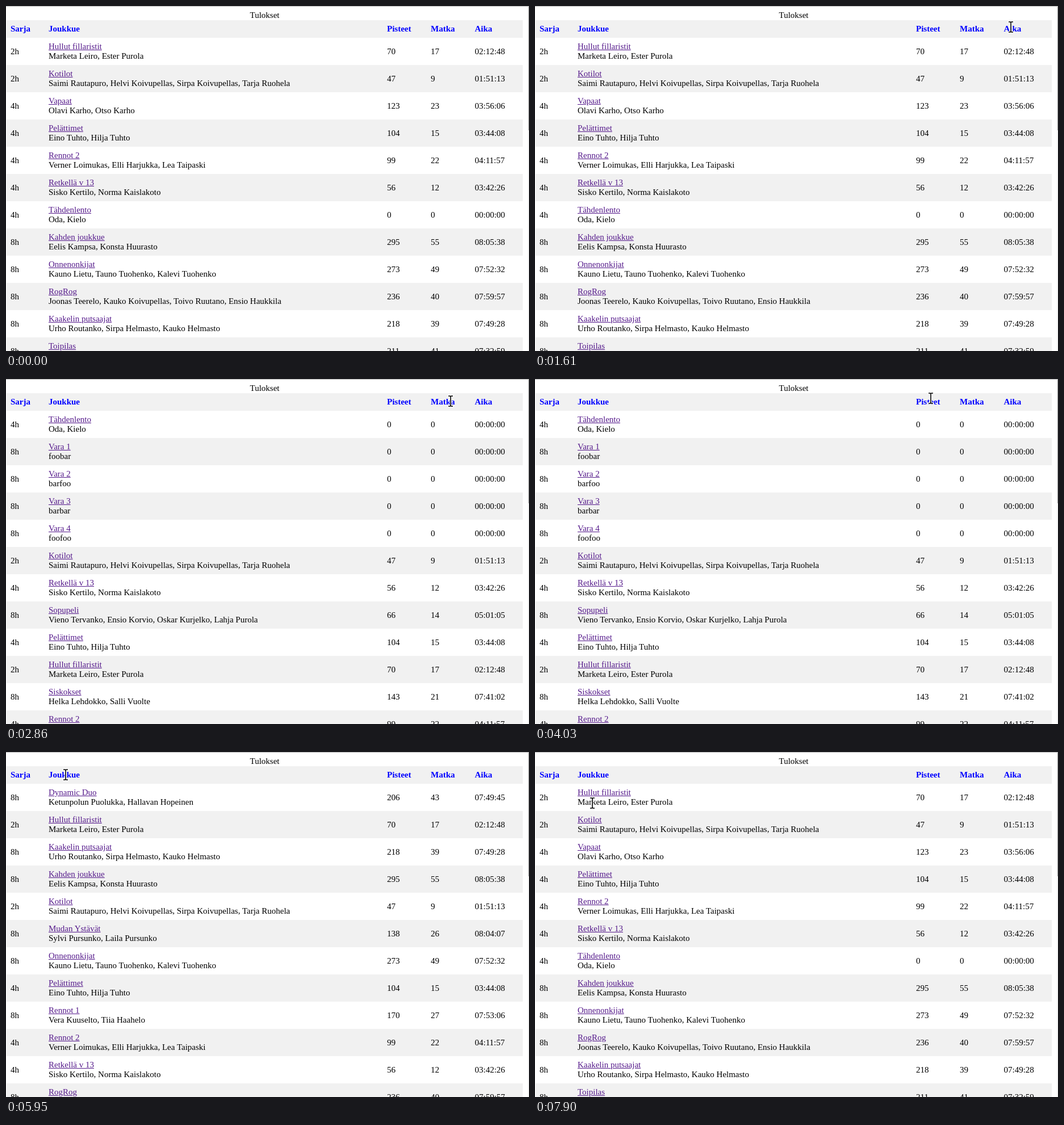
These frames come from a looping animation (921x608 px, 8000 ms). An HTML page:

```html
<!DOCTYPE html>
<html lang="fi">
<head>
<meta charset="utf-8">
<title>Tulokset</title>
<style>
  html, body { margin: 0; width: 100%; height: 100%; overflow: hidden; background: #fff; }
  #stage {
    position: relative; width: 921px; height: 608px; overflow: hidden;
    font: 15px/17px "Liberation Serif", "Times New Roman", serif; color: #000; white-space: nowrap;
  }
  #stage > * { position: absolute; }
  table, caption, thead, tbody, tr, th, td { display: block; margin: 0; padding: 0; text-align: left; }
  table { left: 1px; top: 8px; width: 909px; }
  caption { height: 17px; text-align: center; }
  tr { position: relative; height: 48px; }
  tr:nth-child(even), thead tr { background: #f1f1f1; }
  thead tr { height: 31px; color: #00f; }
  th, td { position: absolute; left: 7px; top: 16px; }
  thead th, td:nth-child(2) { top: 7px; }
  :nth-child(2):is(th, td) { left: 74px; }
  :nth-child(3):is(th, td) { left: 670px; }
  :nth-child(4):is(th, td) { left: 747px; }
  :nth-child(5):is(th, td) { left: 824.5px; }
  u { color: #551a8b; }
  .edge { left: 0; top: 0; width: 921px; height: 1px; background: #b4b4b4; }
  .track { left: 919px; top: 1px; width: 2px; height: 607px; background: #f1f1f1; }
  .thumb { left: 920px; top: 1px; width: 1px; height: 218px; background: #a0a0a0; }
  #click {
    width: 28px; height: 28px; margin: -14px; border-radius: 50%;
    background: rgba(255, 255, 0, .47); pointer-events: none;
  }
  #cursor { left: 0; top: 0; width: 1px; height: 1px; overflow: visible; pointer-events: none; }
</style>
</head>
<body>
<div id="stage">
  <table>
    <caption>Tulokset</caption>
    <thead><tr><th>Sarja<th>Joukkue<th>Pisteet<th>Matka<th>Aika</thead>
    <tbody>
      <tr><td>2h<td><u>Hullut fillaristit</u><br>Marketa Leiro, Ester Purola<td>70<td>17<td>02:12:48
      <tr><td>2h<td><u>Kotilot</u><br>Saimi Rautapuro, Helvi Koivupellas, Sirpa Koivupellas, Tarja Ruohela<td>47<td>9<td>01:51:13
      <tr><td>4h<td><u>Vapaat</u><br>Olavi Karho, Otso Karho<td>123<td>23<td>03:56:06
      <tr><td>4h<td><u>Pelättimet</u><br>Eino Tuhto, Hilja Tuhto<td>104<td>15<td>03:44:08
      <tr><td>4h<td><u>Rennot 2</u><br>Verner Loimukas, Elli Harjukka, Lea Taipaski<td>99<td>22<td>04:11:57
      <tr><td>4h<td><u>Retkellä v 13</u><br>Sisko Kertilo, Norma Kaislakoto<td>56<td>12<td>03:42:26
      <tr><td>4h<td><u>Tähdenlento</u><br>Oda, Kielo<td>0<td>0<td>00:00:00
      <tr><td>8h<td><u>Kahden joukkue</u><br>Eelis Kampsa, Konsta Huurasto<td>295<td>55<td>08:05:38
      <tr><td>8h<td><u>Onnenonkijat</u><br>Kauno Lietu, Tauno Tuohenko, Kalevi Tuohenko<td>273<td>49<td>07:52:32
      <tr><td>8h<td><u>RogRog</u><br>Joonas Teerelo, Kauko Koivupellas, Toivo Ruutano, Ensio Haukkila<td>236<td>40<td>07:59:57
      <tr><td>8h<td><u>Kaakelin putsaajat</u><br>Urho Routanko, Sirpa Helmasto, Kauko Helmasto<td>218<td>39<td>07:49:28
      <tr><td>8h<td><u>Toipilas</u><br>Terhi Vuorla, Elna Rantukko<td>211<td>41<td>07:32:59
      <tr><td>8h<td><u>Dynamic Duo</u><br>Ketunpolun Puolukka, Hallavan Hopeinen<td>206<td>43<td>07:49:45
      <tr><td>8h<td><u>Rennot 1</u><br>Vera Kuuselto, Tiia Haahelo<td>170<td>27<td>07:53:06
      <tr><td>8h<td><u>Tollot</u><br>Lulu, Hippa<td>168<td>35<td>07:06:49
      <tr><td>8h<td><u>Susi jo syntyessään</u><br>Tatu Kaslio, Oskar Ruohotko<td>167<td>40<td>07:48:47
      <tr><td>8h<td><u>Siskokset</u><br>Helka Lehdokko, Salli Vuolte<td>143<td>21<td>07:41:02
      <tr><td>8h<td><u>Mudan Ystävät</u><br>Sylvi Pursunko, Laila Pursunko<td>138<td>26<td>08:04:07
      <tr><td>8h<td><u>Sopupeli</u><br>Vieno Tervanko, Ensio Korvio, Oskar Kurjelko, Lahja Purola<td>66<td>14<td>05:01:05
    </tbody>
  </table>
  <div class="edge"></div><div class="track"></div><div class="thumb"></div>
  <div id="click"></div>
  <svg id="cursor">
    <g id="beam" fill="none">
      <path d="M-2-8H1L2-7L3-8H6M2-7V9M-2 10H1L2 9L3 10H6" stroke="#fff" stroke-width="3.4" stroke-linecap="square"/>
      <path d="M-2-8H1L2-7L3-8H6M2-7V9M-2 10H1L2 9L3 10H6" stroke="#000" stroke-width="1.6"/>
    </g>
    <path id="arrow" d="M.5.5V16.5L4.2 13L6.6 18.6L9 17.6L6.6 12.1H11.8Z" fill="#fff" stroke="#000"/>
  </svg>
</div>
<script>
const LOOP = 8000;
const BEAT = 76; // time between two pointer positions
const [SERIES, TEAM, POINTS, DISTANCE, TIME] = [0, 1, 2, 3, 4];

const $ = id => document.getElementById(id);
const show = (id, on) => { $(id).style.display = on ? '' : 'none'; };
const body = document.querySelector('tbody');

['foobar', 'barfoo', 'barbar', 'foofoo'].forEach((members, i) => {
  body.insertAdjacentHTML('beforeend',
    `<tr><td>8h<td><u>Vara ${i + 1}</u><br>${members}<td>0<td>0<td>00:00:00`);
});
const rows = [...body.rows];

const clicks = [
  { press: 1380, release: 1610, sorted: 1760, column: TIME },
  { press: 2560, release: 2730, sorted: 2860, column: DISTANCE },
  { press: 3790, release: 4030, sorted: 4090, column: POINTS },
  { press: 5570, release: 5810, sorted: 5950, column: TEAM },
  { press: 6730, release: 6960, sorted: 7040, column: SERIES },
];

// pointer strokes: start, end and the place reached
const strokes = [
  [140, 140, 746, 305],
  [220, 220, 773, 234],
  [520, 1210, 836, 36],
  [1940, 2320, 781, 38],
  [2960, 3470, 695, 33],
  [4560, 4710, 149, 0],
  [4880, 5190, 103, 32],
  [5340, 5420, 103, 39],
  [6180, 6580, 18, 40],
  [7360, 7900, 99, 89],
];

function compare(a, b, column) {
  const [x, y] = [a, b].map(row => row.cells[column].textContent.trim());
  if (column === POINTS) return y - x;
  if (column === DISTANCE) return x - y;
  return x < y ? -1 : +(x > y);
}

let current;
function sortBy(column) {
  if (column === current) return;
  current = column;
  body.replaceChildren(...[...rows].sort((a, b) => compare(a, b, column)));
}

// long strokes swing a little past their goal
function glide(u, swing) {
  const v = u - 1;
  return 1 + (swing + 1) * v ** 3 + swing * v ** 2;
}

function pointerAt(t) {
  const i = strokes.findLastIndex(stroke => stroke[0] <= t);
  if (i < 0) return null;
  const [start, end, ...goal] = strokes[i];
  if (start === end) return goal;
  const from = strokes[i - 1].slice(2);
  const count = Math.round((end - start) / BEAT) + 1;
  const step = Math.floor((t - start) / (end - start) * (count - 1) + 1e-6) + 1;
  const k = glide(Math.min(step / count, 1), end - start > 350 ? 1.4 : 0);
  return goal.map((v, axis) => Math.round(from[axis] + (v - from[axis]) * k));
}

function draw(t) {
  sortBy(clicks.findLast(c => c.sorted <= t)?.column ?? SERIES);
  show('click', clicks.some(c => t >= c.press && t < c.release));
  const point = pointerAt(t);
  show('cursor', point);
  if (!point) return;
  const [x, y] = point;
  const overText = document.elementFromPoint(x, y)?.closest('th, td');
  show('beam', overText);
  show('arrow', !overText);
  $('cursor').style.transform = $('click').style.transform = `translate(${x}px, ${y}px)`;
}

const begin = performance.now();
function tick() {
  draw((performance.now() - begin) % LOOP);
  requestAnimationFrame(tick);
}
tick();
</script>
</body>
</html>
```
